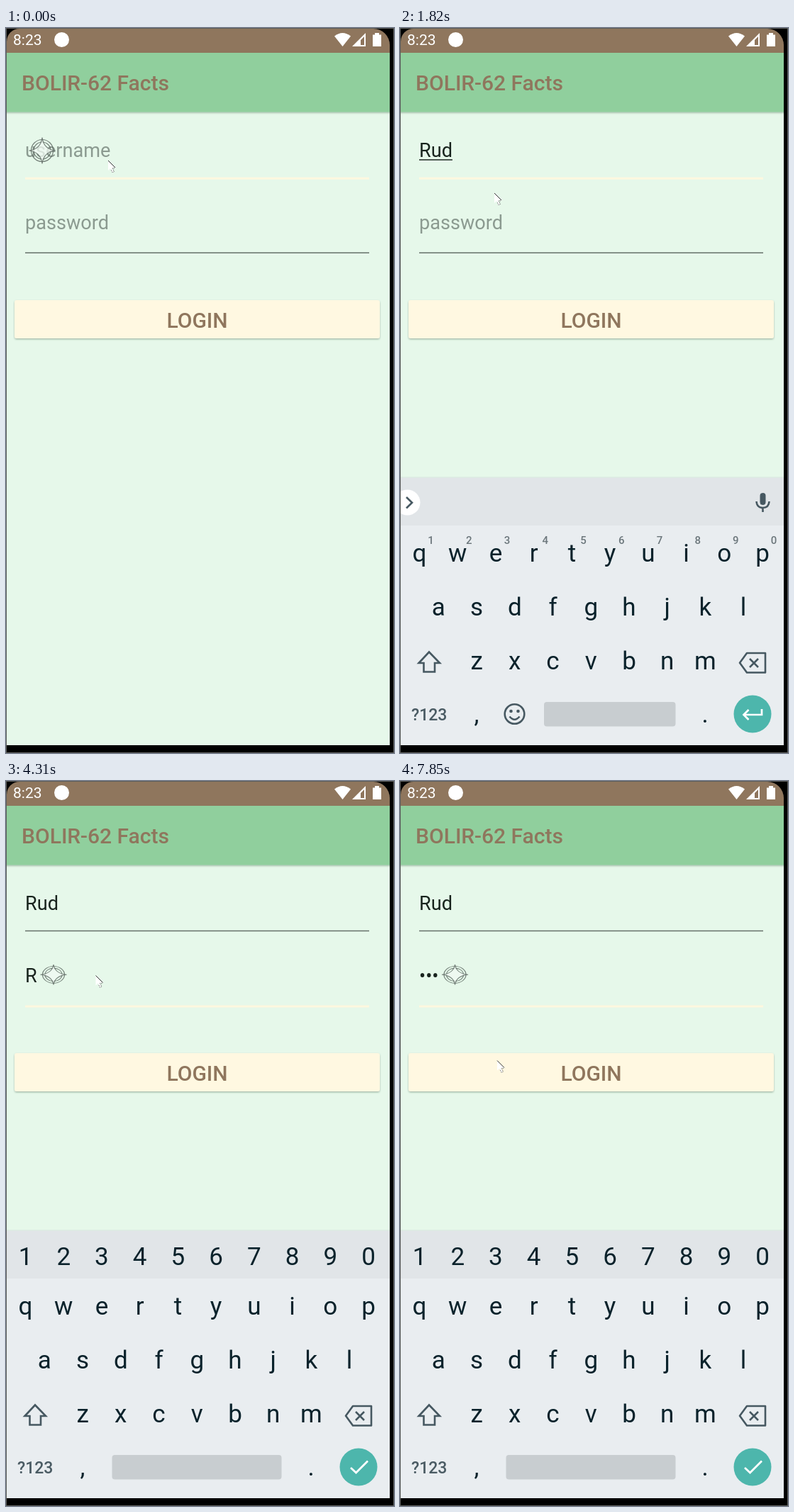
An HTML page for the animation above (8000 ms loop, 547x1023 px).

```html
<!DOCTYPE html>
<html lang="en">
<head>
<meta charset="utf-8">
<title>Login screen</title>
<style>
  html, body { margin: 0; width: 100%; height: 100%; overflow: hidden; background: #000; }
  svg { display: block; width: 100vw; height: 100vh; }
  text { font-family: Roboto, "Noto Sans", sans-serif; white-space: pre; }
  .field { font-size: 27.1px; }
  .key { font-size: 35px; fill: #0a222b; text-anchor: middle; }
  .small { font-size: 15px; font-weight: 500; fill: #6b767b; text-anchor: middle; }
  .pick { font-size: 23px; fill: #263238; text-anchor: middle; }
  .icon { fill: none; stroke: #465861; stroke-width: 2.6; }
</style>
</head>
<body>
<svg viewBox="0 0 547 1023" preserveAspectRatio="none">
  <defs>
    <filter id="low" x="-5%" y="-20%" width="110%" height="150%">
      <feDropShadow dx="0" dy="1.3" stdDeviation="1.2" flood-color="#294536" flood-opacity=".38"/>
    </filter>
    <filter id="high" x="-5%" y="-20%" width="110%" height="160%">
      <feDropShadow dx="0" dy="2" stdDeviation="2.3" flood-color="#294536" flood-opacity=".45"/>
    </filter>
    <clipPath id="buttonClip"><rect x="12" y="384" width="515" height="54" rx="3"/></clipPath>
    <clipPath id="screenClip"><rect x="1" y="1" width="540" height="1011"/></clipPath>
  </defs>

  <rect width="547" height="1023"/>
  <g clip-path="url(#screenClip)">
    <rect width="541" height="1012" fill="#e6f8ea"/>
    <rect x="-10" y="35" width="561" height="83.5" fill="#90cf9d" filter="url(#low)"/>
    <rect width="541" height="35"/>
    <path d="M1 35V19A18 18 0 0 1 19 1H518A23 23 0 0 1 541 24V35Z" fill="#8f765d"/>
    <text x="22" y="88" font-size="30" font-weight="500" fill="#8f765d">BOLIR-62 Facts</text>

    <g fill="#fff">
      <text x="10" y="24" font-size="21">8:23</text>
      <g id="keyIcon">
        <rect x="69" y="10" width="19.500" height="13" rx="2"/>
        <path d="M72 13.500H86M72 16.500H86" stroke="#8f765d" stroke-width="1.6" stroke-dasharray="1.700 1.300"/>
        <path d="M75 20.300H83" stroke="#8f765d" stroke-width="1.6"/>
      </g>
      <circle id="badge" cy="16.500" r="10.500"/>
      <path d="M463 11.500Q474.500 2.500 486 11.500L474.500 26Z"/>
      <path d="M488 26L507 7V26ZM500 17V24H505V12Z" fill-rule="evenodd"/>
      <path d="M517 9.500H520V7H526V9.500H529V26H517Z"/>
    </g>

    <text id="user" class="field" x="27" y="182"></text>
    <path id="compose" stroke="#1c2620" stroke-width="1.5"/>
    <path id="userLine"/>
    <text id="pass" class="field" x="27" y="284"></text>
    <path id="passLine"/>

    <rect id="button" x="12" y="384" width="515" height="54" rx="3" fill="#fff8e1"/>
    <circle id="ripple" cx="137" cy="403" fill="#dfdbc5" clip-path="url(#buttonClip)"/>
    <text x="269.500" y="423" font-size="30" font-weight="500" fill="#8f765d" text-anchor="middle">LOGIN</text>

    <g id="keyboard">
      <rect y="634" width="541" height="69" fill="#e1e5e8"/>
      <path d="M0 634H541" stroke="#dcebe2" stroke-width="1.5"/>
      <rect y="702" width="541" height="330" fill="#e9edf0"/>
      <g id="letters"></g>
      <g id="wordMode">
        <circle cx="10.500" cy="669.500" r="18" fill="#fff"/>
        <path d="M9 662L17 669.700L9 677.500" class="icon"/>
        <rect x="507.500" y="656" width="8" height="17" rx="4" fill="#465861"/>
        <path d="M502.500 668Q503 677 511.500 677T520.500 668M511.500 677V683" class="icon"/>
        <g id="picks">
          <text class="pick" x="105" y="677">Rud</text>
          <text class="pick" x="259" y="677">Rude</text>
          <text class="pick" x="413" y="677">Ruds</text>
        </g>
        <g class="icon">
          <circle cx="161.500" cy="968" r="13.800"/>
          <path d="M154.500 971.500Q161.500 980 168.500 971.500"/>
        </g>
        <g fill="#465861"><circle cx="156.500" cy="964" r="2.300"/><circle cx="166.500" cy="964" r="2.300"/></g>
      </g>
      <rect id="space" y="951" height="34.500" rx="4" fill="#c8cdd0"/>
      <path class="icon" d="M41 880.500L26.500 896H33.500V908.500H49V896H56Z"/>
      <path class="icon" stroke-linejoin="round" d="M489 882H515V909.500H489L479 895.700ZM493 890L505 902M505 890L493 902"/>
      <text x="16" y="977" font-size="23" font-weight="500" fill="#4a5b63">?123</text>
      <text class="key" x="108" y="980">,</text>
      <text class="key" x="430" y="980">.</text>
      <circle cx="497" cy="968" r="26.500" fill="#4db6ac"/>
      <path id="action" fill="none" stroke="#fff" stroke-width="2.7"/>
    </g>

    <g id="caret" fill="none" stroke="#59645e" stroke-opacity=".8" stroke-width="1.2">
      <circle r="15.500"/>
      <circle r="12"/>
      <path d="M0 -18.500Q2 -2 18.500 0Q2 2 0 18.500Q-2 2 -18.500 0Q-2 -2 0 -18.500Z" fill="#f1faf3" fill-opacity=".75"/>
    </g>

    <g id="pointer">
      <path d="M0 0V14L3 11L5.500 17L8 16L5.500 10.500H10Z" fill="#fff"/>
      <path d="M0 0L10 10" stroke="#333" stroke-width="1"/>
      <path d="M9 10.800H6L8.500 15.500L6 16.800L4 12.500" fill="none" stroke="#555" stroke-width=".9" stroke-dasharray="1.500 1.200"/>
    </g>
  </g>
  <rect x=".5" y=".5" width="546" height="1022" fill="none" stroke="#5b5d5b"/>
</svg>

<script>
const LOOP = 8000;
const STEP = 53.72;
const FIRST = 27.5;
const $ = id => document.getElementById(id);
const set = (id, attrs) => {
  for (const name in attrs) $(id).setAttribute(name, attrs[name]);
};
const show = (id, on) => set(id, { visibility: on ? "inherit" : "hidden" });

// Each entry is [start time, value]; a value holds until the next entry.
const username = [[0, ""], [1000, "R"], [1120, "Ru"], [1260, "Rud"]];
const password = [[0, ""], [4310, "R"], [4590, "•u"], [4870, "••d"], [6280, "•••"]];
const caretX = [
  [0, 51], [1000, 67], [1120, 83], [1260, 98], [1670, 0], [2220, 98],
  [2370, 51], [2920, 0], [3350, 51], [3910, 0], [4310, 67], [4590, 75],
  [4870, 84], [5270, 0], [5840, 84], [6280, 0], [6860, 77.5], [7290, 0], [7850, 77.5]
];
const pointer = [
  [0, [144, 187]], [1670, [141, 199]], [1820, [133, 233]], [1950, [128, 258]],
  [2100, [126.5, 274.5]], [5420, [132, 315]], [5540, [137, 349]],
  [5700, [137, 391]], [5840, [137, 393.5]], [6000, [137, 394.5]]
];
const keyboard = [[0, [380, 0]], [1000, [28, .6]], [1120, [.5, .96]], [1260, [0, 1]]];
const ripple = [[0, [0, 0]], [7020, [370, 1]], [7170, [420, .5]], [7290, [0, 0]]];

function at(track, t) {
  let value = track[0][1];
  for (const [start, next] of track) if (t >= start) value = next;
  return value;
}

// Places a row of keys on the shared grid, starting at the given column.
function keyRow(chars, column, y, cls, group) {
  return `<g id="${group}">` + [...chars].map((c, i) =>
    `<text class="${cls}" x="${FIRST + (column + i) * STEP}" y="${y}">${c}</text>`).join("") + "</g>";
}

$("letters").innerHTML =
  keyRow("1234567890", 0, 683, "key", "digits") +
  keyRow("1234567890", .3, 728, "small", "hints") +
  keyRow("qwertyuiop", 0, 753, "key", "top") +
  keyRow("asdfghjkl", .5, 829, "key", "middle") +
  keyRow("zxcvbnm", 1.5, 905, "key", "bottom");

function field(id, value, hint) {
  $(id).textContent = value || hint;
  set(id, { fill: value ? "#18231d" : "#8b9a90" });
}

function underline(id, y, focused) {
  set(id, {
    d: `M27 ${y}H512`,
    stroke: focused ? "#fdf8df" : "#66716a",
    "stroke-width": focused ? 3 : 1.6
  });
}

function draw(t) {
  const onPass = t >= 2370;
  const numeric = t >= 2650;
  const name = at(username, t);

  field("user", name, "username");
  field("pass", at(password, t), "password");
  underline("userLine", onPass ? 211.5 : 212.3, !onPass);
  underline("passLine", onPass ? 318 : 317.3, onPass);
  const end = 27 + (name ? $("user").getComputedTextLength() : 0);
  set("compose", { d: `M27 186H${end}` });
  show("compose", name && !onPass);

  const busy = t >= 2100 && t < 2490;
  show("keyIcon", busy);
  set("badge", { cx: busy ? 111.5 : 78.5 });

  const [drop, alpha] = at(keyboard, t);
  set("keyboard", { transform: `translate(0 ${drop})`, opacity: alpha });
  show("wordMode", !numeric);
  show("hints", !numeric);
  show("digits", numeric);
  show("picks", t >= 2100 && t < 2370);
  const left = numeric ? 149.5 : 203;
  set("space", { x: left, width: 388.5 - left });
  set("action", {
    d: numeric ? "M486 969L493.500 976L510 959.500"
      : "M510 961V969H485M491.500 962L484.500 969L491.500 976"
  });

  const x = at(caretX, t);
  show("caret", x > 0);
  set("caret", { transform: onPass ? `translate(${x} 273.300) scale(1 .77)` : `translate(${x} 173)` });
  set("pointer", { transform: `translate(${at(pointer, t)})` });

  const [radius, strength] = at(ripple, t);
  set("ripple", { r: radius, opacity: strength });
  set("button", { filter: strength === 1 ? "url(#high)" : "url(#low)" });
}

function tick() {
  draw(performance.now() % LOOP);
  requestAnimationFrame(tick);
}
tick();
</script>
</body>
</html>
```
